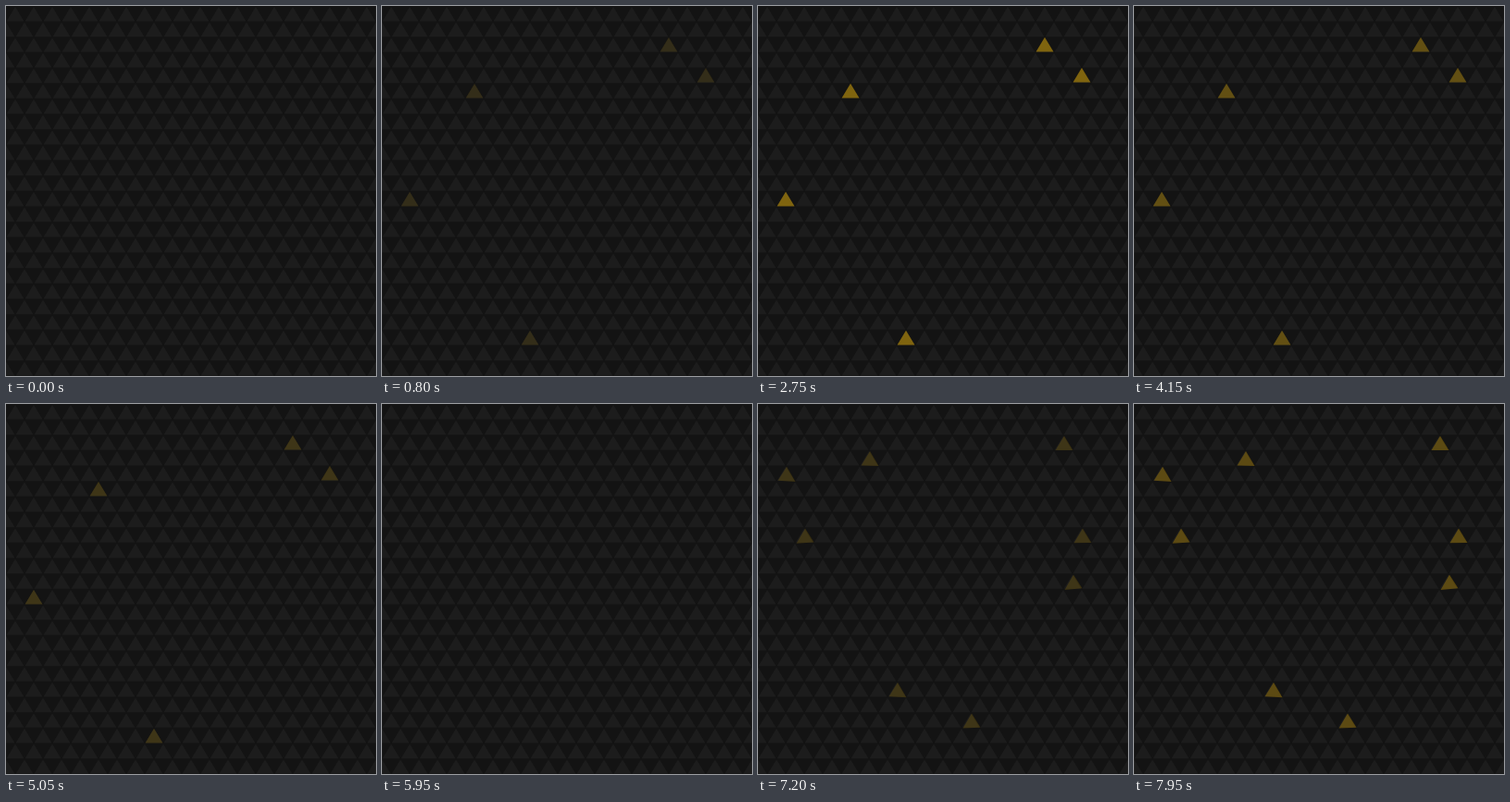
These frames come from a looping animation (400x400 px, 8000 ms). An HTML page with a canvas:

```html
<!DOCTYPE html>
<html lang="en">
<head>
<meta charset="utf-8">
<title>Glowing triangles</title>
<style>
html, body { margin: 0; width: 100%; height: 100%; overflow: hidden; background: #131313; }
canvas { display: block; }
</style>
</head>
<body>
<canvas id="stage" width="400" height="400"></canvas>
<script>
const ctx = document.getElementById('stage').getContext('2d');
const LOOP = 8000, STEP = 150, HALF = 19, ROW = 50 / 3;

// Lit cells as [centre x, row]; the second group runs from left-leaning to right-leaning
const upright = [[310, 2], [350, 4], [100, 5], [30, 12], [160, 21]];
const leaning = [[340, 11], [50, 8], [230, 20], [350, 8], [330, 2], [120, 3], [150, 18], [30, 4]];

// Triangle in a cell whose top is y; lean lowers its right corner and raises its left
function triangle(x, y, lean = 0) {
  const base = y + ROW - 0.2;
  ctx.beginPath();
  ctx.moveTo(x, y + 0.8);
  ctx.lineTo(x - 9.5, base - lean);
  ctx.lineTo(x + 9.5, base + lean);
  ctx.fill();
}

function drawPattern() {
  ctx.fillStyle = '#131313';
  ctx.fillRect(0, 0, 400, 400);
  ctx.fillStyle = '#1c1c1c';
  for (let row = 0; row < 24; row++)
    for (let x = row % 2 ? 0 : 10; x <= 400; x += 20) triangle(x, row * ROW);
}

// Opacity rises linearly to one half and falls back, in discrete steps
function glow(elapsed) {
  // the fade lingers briefly just after its peak
  if (elapsed > 3150) elapsed = Math.max(3150, elapsed - 50);
  const step = Math.floor(elapsed / STEP);
  const level = Math.max(0, 1 - Math.abs(step - HALF) / HALF);
  ctx.fillStyle = `rgba(250, 190, 0, ${level / 2})`;
}

function draw(now) {
  const t = now % LOOP;
  drawPattern();
  glow(t - 200);
  upright.forEach(([x, row]) => triangle(x, Math.floor(row * ROW)));
  glow(t - 6300);
  leaning.forEach(([x, row], i) => triangle(x + 1, row * ROW + 0.3, -0.8 + i * 0.2));
  requestAnimationFrame(draw);
}
requestAnimationFrame(draw);
</script>
</body>
</html>
```
